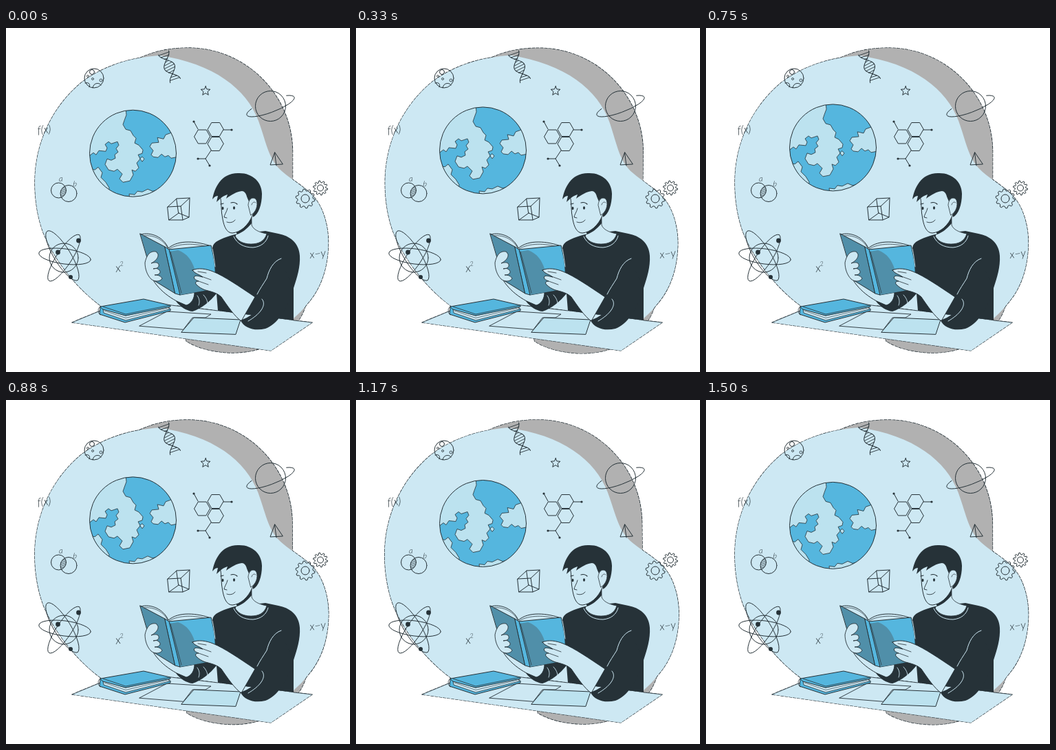
Write an HTML page with a canvas that moves like this. It is 500 by 500 pixels and loops after 1540 ms.

```html
<!DOCTYPE html>
<html lang="en">
<head>
<meta charset="utf-8">
<title>Reading about science</title>
<style>
html, body { margin: 0; width: 100%; height: 100%; overflow: hidden; background: #fff; }
canvas { display: block; width: 500px; height: 500px; }
</style>
</head>
<body>
<canvas id="stage" width="500" height="500"></canvas>
<script>
const ctx = document.getElementById('stage').getContext('2d');
const LOOP = 1540, TAU = Math.PI * 2;
const DARK = '#263238', PALE = '#cde8f3', LAND = '#bce2ef', BLUE = '#55b6de',
      SHADE = '#508fa9', GREY = '#b1b1b1';

function paint(path, fill, stroke, width = 1) {
  const p = typeof path === 'string' ? new Path2D(path) : path;
  if (fill) { ctx.fillStyle = fill; ctx.fill(p); }
  if (stroke) { ctx.strokeStyle = stroke; ctx.lineWidth = width; ctx.stroke(p); }
}
const line = (path, color = DARK, width = 1) => paint(path, null, color, width);

function oval(x, y, rx, ry = rx, turn = 0, from = 0, to = TAU) {
  const p = new Path2D();
  p.ellipse(x, y, rx, ry, turn, from, to);
  return p;
}
const dot = (x, y, r) => paint(oval(x, y, r), DARK);

// Closed polar outline: radius(i) gives the distance of corner i
function polar(x, y, count, radius, start = 0) {
  const p = new Path2D();
  for (let i = 0; i < count; i++) {
    const a = start + i / count * TAU, r = radius(i);
    p.lineTo(x + r * Math.cos(a), y + r * Math.sin(a));
  }
  p.closePath();
  return p;
}

function label(text, x, y, size, turn = 0) {
  ctx.save();
  ctx.translate(x, y);
  ctx.rotate(turn);
  ctx.font = `italic 300 ${size}px Lato, sans-serif`;
  ctx.fillStyle = DARK;
  ctx.fillText(text, 0, 0);
  ctx.restore();
}

const greyBlob = new Path2D('M190 46C213 34 238 29 265 29C348 29 416.5 97 416.5 180V222L436 400C433 414 426 426 417 434C398 456 372 472 327 472C300 471 278 465 262 455Z');
const blueBlob = new Path2D('M222 40C302 51 350 89 367 135C380 172 382 192 402 209C416 221 434 231 446 244C461 260 468.5 287 468.5 312C468 350 457 380 437 402C430 412 422 418 414 426L250 440L150 412C111 388 72 342 54 297C46 275 42 250 42 225C42 164 70 112 110 79C142 55 181 43 222 40Z');
const tableTop = new Path2D('M96 428L137 411L240 403L308 411L418 425L445 428L385 469Z');

function backdrop(angle) {
  const turned = draw => {
    ctx.save();
    ctx.translate(250, 250);
    ctx.rotate(angle);
    ctx.translate(-250, -250);
    draw();
    ctx.restore();
  };
  // Broken rim first, so only its outer half stays visible
  ctx.setLineDash([4, 2]);
  turned(() => { line(greyBlob, DARK, 1.4); line(blueBlob, DARK, 1.4); });
  ctx.setLineDash([]);
  turned(() => { paint(greyBlob, GREY); paint(blueBlob, PALE); });
}

function globe(cy) {
  const disc = oval(184.5, 182, 63);
  ctx.save();
  ctx.translate(0, cy - 182);
  paint(disc, LAND);
  ctx.save();
  ctx.clip(disc);
  paint('M174 116L175 126L172 134L170 140L174 147L181 149L185 156L189 160L187 167L193 170L199 177L198 182L192 184L195 190L190 196L193 203L188 208L183 206L185 213L180 222L170 224L165 219L169 212L162 205L157 208L149 206L144 198L147 190L153 192L159 189L158 184L163 180L160 175L164 170L162 165L153 168L149 165L144 169L147 174L145 179L135 178L131 184L127 181L118 188V250H250V187L240 189L236 185L231 187L226 183L221 188L214 187L211 184L214 178L209 172L212 167L222 166L220 159L229 161L232 155L243 151L250 110Z', BLUE, DARK, .8);
  paint('M198 187L201 190L198 194L195 190ZM118 203L129 206L134 202L140 210L138 217L145 224L150 232L148 245L118 225ZM180 250L179 241L187 242L191 237L198 238L206 234L213 237L222 235L235 240L215 250Z', LAND, DARK, .8);
  ctx.restore();
  line(disc);
  ctx.restore();
}

function moon() {
  line(oval(128, 73, 14));
  line(oval(125, 64, 3.5));
  for (const [x, y, r] of [[119, 70, 1.5], [126, 74, 1.5], [138, 76, 2]]) line(oval(x, y, r), DARK, .8);
  line('M126 87C127 79 136 79 138 83M115 80C121 78 123 83 121 86');
}

function dna() {
  ctx.save();
  ctx.translate(229, 36);
  ctx.rotate(-.4);
  const side = y => 8 * Math.cos(y / 42 * TAU * .95);
  for (const sign of [1, -1]) {
    const p = new Path2D();
    for (let y = 0; y <= 44; y++) p.lineTo(sign * side(y), y);
    line(p);
  }
  for (let y = 1; y < 44; y += 4) line(`M${-side(y)} ${y}L${side(y)} ${y + 1}`, DARK, .8);
  ctx.restore();
}

function saturn() {
  line(oval(384.5, 113.5, 22));
  line(oval(384.5, 113.5, 37, 9, -.36, -.75, Math.PI + .75));
}

function molecule() {
  for (const [x, y] of [[285, 158], [304.5, 147.5], [304.5, 168.5]]) line(polar(x, y, 6, () => 11.5));
  line('M273 136L279 147M316 148H328M298 178L290 190H279M290 190L296 200');
  for (const [x, y] of [[273, 136], [328, 148], [279, 190], [296, 200]]) dot(x, y, 1.6);
}

function gear(x, y, r, hole) {
  line(polar(x, y, 40, i => i % 4 < 2 ? r : r - 2.8, .1));
  line(oval(x, y, hole));
}

function venn() {
  const left = oval(76.5, 236, 11), right = oval(91, 240.5, 12);
  line(left);
  line(right);
  ctx.save();
  ctx.clip(left);
  ctx.clip(right);
  for (let y = 228; y < 256; y += 2.5) line(`M76 ${y}L92 ${y - 6}`, DARK, .8);
  ctx.restore();
  label('a', 77, 223, 11);
  label('b', 97, 230, 11, .1);
}

function atom() {
  line(oval(84, 334, 21));
  line(oval(85.5, 332, 38, 11, .13));
  line(oval(82, 331, 42, 12, 1.02));
  line(oval(84.5, 334, 40, 11, -.99));
  dot(105.5, 309, 3.4);
  dot(75.5, 326, 3.4);
  dot(94, 362, 3);
}

function icons() {
  moon();
  dna();
  saturn();
  molecule();
  venn();
  atom();
  line(polar(290, 91.5, 10, i => i % 2 ? 3.2 : 7.2, -Math.PI / 2));
  line('M390.5 181L384 199L402 198ZL393 200');
  gear(435, 248, 14, 6);
  gear(457, 232.5, 10.5, 4.5);
  line('M235 260L254 259L257 279L237 279ZM248 248L267 247L266 275L251 269ZM235 260L248 248M254 259L267 247M257 279L266 275M237 279L251 269');
  label('f(x)', 46, 154, 16, -.08);
  label('x', 160, 355, 17, -.15);
  label('2', 166, 346, 9, -.15);
  label('x−y', 442, 335, 16, -.13);
}

function table() {
  ctx.setLineDash([4, 2]);
  line(tableTop, DARK, 1.2);
  ctx.setLineDash([]);
  paint(tableTop, PALE);
  line('M96 428L137 411M240 403L308 411M418 425L445 428', DARK, .7);
  paint('M194 433L234 412L298 416L290 421L271 421L258 438Z', PALE, DARK, .9);
  paint('M255 442L273 421L341 424L334 445Z', LAND, DARK);
}

function closedBook() {
  paint('M137 405L136 416L173 428L239 411V408L174 422Z', BLUE, DARK);
  paint('M141 408L142 414L174 425L237 409V404L174 418Z', PALE, DARK, .8);
  line('M143 411L174 421.5L237 406.5', DARK, .6);
  paint('M137 405L200 394L239 403V405L174 418L141 409Z', BLUE, DARK);
  line('M137 405C133 407 133 414 137 417M141 405L174 416L238 403', DARK, .8);
}

function torso() {
  paint('M333 300C318 304 304 309 301 316C296 330 300 357 303 365C290 373 274 382 266 388L247 397C253 405 262 411 271 412C284 408 297 397 306 386L308 411L418 425V378C423 363 428 347 427 331C426 312 412 302 396 299L377 295Z', DARK);
  paint('M357 274L357 286C359 293 368 297 379 299C376 310 367 314 356 314C344 314 336 309 333 302L337 298Z', PALE, DARK, .8);
  line('M331 303C336 314 346 319 359 319C371 318 379 311 381 302', PALE);
  paint('M357 272L357 284C350 292 344 297 336 300L334 295C345 292 352 283 357 272Z', DARK);
}

function head() {
  paint('M311 243C314 254 312 266 315 278C317 289 321 298 329 298C341 297 352 287 358 273L366 258L352 230H318Z', PALE, DARK);
  paint('M300 249C303 233 312 211 337 211C358 210 372 224 372 241C372 257 367 271 359 275C358 261 353 253 350 245C349 240 346 237 343 237C335 238 328 242 320 248L322 242C315 244 310 249 306 253L308 244C304 244 302 247 300 249Z', DARK);
  paint('M352 257C353 246 361 245 364 250C367 258 363 268 356 272Z', PALE, DARK, .8);
  line('M357 257C358 253 361 252 363 254', DARK, .7);
  paint(oval(315, 262, 1.5, 2.2), DARK);
  paint(oval(331.5, 261.5, 1.5, 2.2), DARK);
  line('M312 256L316 255M327 254C330 253 334 254 336 256', DARK, 1.2);
  line('M322 262C321 267 317 272 317 275L321 276M321 282C326 284 331 282 333 279', DARK, .9);
}

function openBook() {
  paint('M207 348C209 365 224 384 248 397L262 403C269 401 274 394 274 384L240 370Z', PALE, DARK);
  paint('M196 300C211 296 229 304 236 320C251 307 278 310 298 317L290 340L237 340Z', PALE, DARK);
  line('M200 302C216 300 230 309 235 320M237 321C252 312 275 313 293 318', DARK, .7);
  paint('M195 299L231 318L246 386L215 367Z', SHADE, DARK);
  paint('M236 322L298 316C302 332 305 349 304 360L299 380L253 388Z', BLUE, DARK);
  paint('M238 325L250 323C264 328 270 338 274 350L300 373L299 380L253 388Z', SHADE);
  paint('M231 318L237 322L253 388L246 386Z', BLUE, DARK);
  line('M239 325L255 385', DARK, .7);
}

function hands() {
  paint('M218 325C209 323 204 331 202 341C202 350 205 359 211 365C217 370 225 368 227 364C224 359 219 359 216 359C222 359 226 356 223 352C220 349 217 349 214 350C221 350 224 346 221 342C218 340 214 341 211 342C217 339 222 334 221 329Z', PALE, DARK, .9);
  paint('M271 352C279 348 291 350 301 354C318 361 338 375 362 391L342 426C332 419 322 404 313 391C307 385 298 383 290 381C284 379 280 376 278 374C274 371 275 368 280 368C275 366 272 364 274 361C276 359 281 361 286 362C281 358 274 357 271 352Z', PALE, DARK);
  line('M280 368L294 373M284 361L298 366M279 354L291 356', DARK, .8);
}

function sleeve() {
  paint('M361 389C374 397 373 404 362 413C354 420 345 423 341 425C346 436 361 441 377 437C394 431 408 410 418 380L405 350Z', DARK);
  line('M400 335C388 339 382 352 379 364C374 372 369 379 365 387M372 394C380 403 368 417 352 426', PALE);
  line('M287 388C291 392 293 397 293 401M278 389C281 393 282 398 280 403M300 321C302 329 303 340 304 347', PALE, .9);
}

function frame() {
  const t = performance.now() % LOOP;
  ctx.fillStyle = '#fff';
  ctx.fillRect(0, 0, 500, 500);
  ctx.lineJoin = ctx.lineCap = 'round';
  backdrop(.012 * Math.sin(t / LOOP * TAU));
  icons();
  globe(178.1 - 4.3 * Math.cos((t - 705) / LOOP * TAU));
  table();
  closedBook();
  torso();
  head();
  openBook();
  hands();
  sleeve();
  requestAnimationFrame(frame);
}
frame();
</script>
</body>
</html>
```
